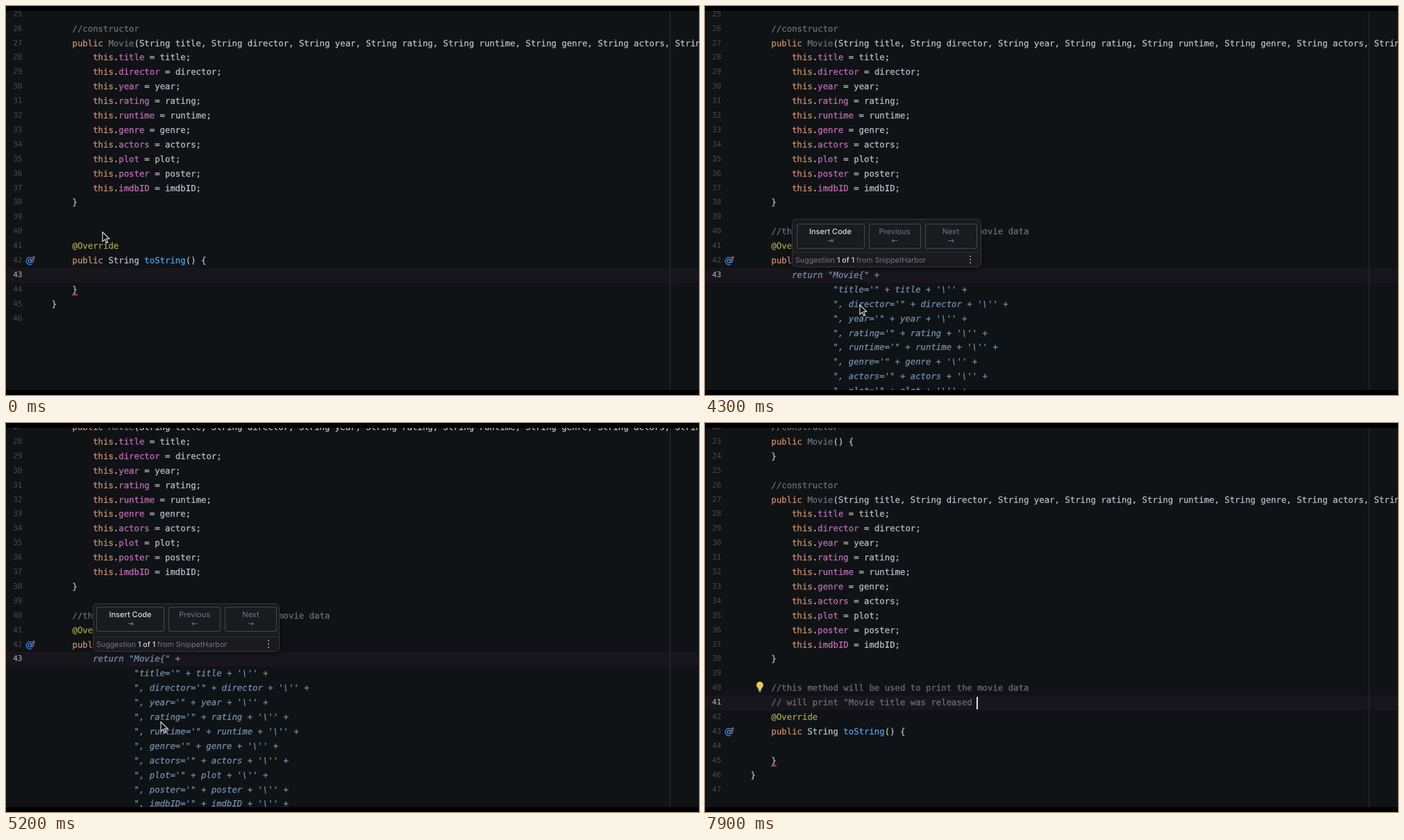
These frames come from a looping animation (998 by 561 pixels, 8 s). An HTML page:

```html
<!DOCTYPE html>
<html lang="en">
<head>
<meta charset="utf-8">
<title>Code suggestion</title>
<style>
  html, body { margin: 0; width: 100%; height: 100%; overflow: hidden; background: #000; }
  #editor {
    position: absolute; left: 0; top: 7px; width: 998px; height: 547px;
    overflow: hidden; background: #0f1315; text-rendering: geometricPrecision;
  }
  #editor div, #editor svg { position: absolute; }
  .row { left: 0; width: 998px; height: 20.9px; line-height: 20.9px; white-space: pre; }
  .num {
    left: 0; width: 23.5px; text-align: right; color: #484b50;
    font: 11px/20.9px "DejaVu Sans Mono", monospace;
  }
  .row.cur { background: #18161c; }
  .cur .num { color: #b4b6bb; }
  .code {
    left: 65.8px; color: #bcbec4; font: 12.32px/20.9px "DejaVu Sans Mono", monospace;
    letter-spacing: calc(7.418px - 1ch); -webkit-text-stroke: .25px;
  }
  .key { color: #cf8e6d; }
  .field { color: #c46cbb; }
  .note { color: #a9a34f; }
  .fn { color: #4f9fee; }
  .dim { color: #6c6f74; }
  .ghost { color: #7590b3; font-style: italic; }
  #margin { left: 955.5px; top: 0; width: 1px; height: 547px; background: #2c2f31; }
  #caret { width: 2px; height: 18px; background: #dfe1e5; }
  #popup {
    --pad: 4px; left: 125px; width: 267px; height: 68px;
    border: 1px solid #36383d; border-radius: 6px; background: #191b1f;
    box-shadow: 0 2px 6px #0008; color: #74777d; font: 11px/14px Inter, sans-serif;
  }
  #popup.wide { --pad: 5.5px; width: 271px; }
  .btn {
    top: var(--pad); height: 36px; border: 1px solid #45474c; border-radius: 2px;
    text-align: center; box-sizing: border-box;
  }
  .btn b { display: block; font-weight: 400; margin-top: 3px; }
  .btn span { display: block; font: 11px/13px "DejaVu Sans", sans-serif; }
  .btn.on b { color: #d8dade; font-weight: 500; }
  #foot {
    left: 0; right: 0; top: 47px; height: 21px; border-top: 1px solid #2b2d31;
    line-height: 21px; padding-left: 4px; font-size: 10.7px; white-space: pre;
  }
  #foot b { color: #d8dade; font-weight: 500; }
  #dots { right: 8px; top: 0; color: #c4c6ca; font: 14px/21px "DejaVu Sans", sans-serif; }
</style>
</head>
<body>
<div id="editor">
  <div id="rows"></div>
  <div id="margin"></div>
  <div id="caret"></div>
  <svg id="bulb" width="14" height="18" style="left:72px">
    <circle cx="7" cy="6" r="4.9" fill="#f2c55c"/>
    <path d="M4.6 9h4.8v3H4.6z" fill="#f2c55c"/>
    <path d="M4.8 13h4.4M5.6 15h2.8" stroke="#c9ccd1" stroke-width="1.3"/>
  </svg>
  <div id="popup">
    <div class="btn on" style="left:var(--pad);width:98px"><b>Insert Code</b><span>⇥</span></div>
    <div class="btn" style="left:calc(var(--pad) + 104px);width:75px"><b>Previous</b><span>←</span></div>
    <div class="btn" style="left:calc(var(--pad) + 185px);width:75px"><b>Next</b><span>→</span></div>
    <div id="foot">Suggestion <b>1 of 1</b> from SnippetHarbor<div id="dots">⋮</div></div>
  </div>
  <svg id="mouse" width="14" height="20">
    <path d="M1 1v13.6l3.2-3 2.4 5.2 2.1-.9-2.3-5.1h4.4z" fill="#0a0a0a" stroke="#e8e8e8" stroke-width="1.1"/>
  </svg>
</div>
<script>
const LOOP = 8000, STEP = 100, TOP = 7;
const ROW = 20.9, CHAR = 7.418, LEFT = 65.8;
const FIRST = 22, FIRST_Y = -50.5;   // number and centre of the first row, unscrolled
const POPUP_ROOM = 36;               // the popup flips below the code when its top would be higher
const $ = id => document.getElementById(id);

const fields = 'title director year rating runtime genre actors plot poster imdbID'.split(' ');
const extra = 'imdbRating imdbVotes type response error'.split(' ');
const pad = ' '.repeat(4);
const comment = '//this method will be used to print the movie data';
const comment2 = '// will print "Movie title was released ';

const params = fields.map(f => 'String ' + f).join(', ');
const head = [
  '//constructor', 'public Movie() {', '}', '',
  '//constructor', `public Movie(${params}) {`,
  ...fields.map(f => `${pad}this.${f} = ${f};`), '}', ''
].map(s => pad + s);

const ghost = [
  pad + pad + 'return "Movie{" +',
  ...[...fields, ...extra].map((f, i) => `${pad.repeat(4)}"${i ? ', ' : ''}${f}='" + ${f} + '\\'' +`),
  pad.repeat(4) + "'}';"
];

const icon = `<svg width="18" height="16" style="left:28px;top:2px" fill="none">
  <circle cx="6.3" cy="8.8" r="2.3" stroke="#4a86e0" stroke-width="1.3"/>
  <path d="M9 13.2A5.2 5.2 0 1 1 11.5 8.8Q11.3 11.4 9 10.6V6.4" stroke="#4a86e0" stroke-width="1.2"/>
  <path d="M12 8V2.4M10 4.2l2-2 2 2" stroke="#d0574f" stroke-width="1.1"/></svg>`;
const squiggle = `<svg width="9" height="5" style="left:95px;top:15px" fill="none">
  <path d="M.5 3.5l2-2 2 2 2-2 1.5 1.5" stroke="#e0504c" stroke-width="1.2"/></svg>`;

const kinds = ['key', 'field', 'note', 'fn', 'dim'];
const token = /(public|this)|(?<=this\.)(\w+)|(@Override)|(toString)|(Movie)/g;
const span = (kind, s) => `<span class="${kind}">${s}</span>`;
const paint = s => s.trim().startsWith('//')
  ? span('dim', s)
  : s.replace(token, (m, ...g) => span(kinds[g.slice(0, 5).findIndex(Boolean)], m));

// Piecewise linear value at time t through [time, value] points
function along(t, pts) {
  if (t <= pts[0][0]) return pts[0][1];
  for (let i = 1; i < pts.length; i++) {
    const [a, u] = pts[i - 1], [b, v] = pts[i];
    if (t <= b) return u + (v - u) * (t - a) / (b - a);
  }
  return pts[pts.length - 1][1];
}
const within = (t, spans) => spans.some(([a, b]) => t >= a && t < b);
const show = (el, on) => { el.style.display = on ? 'block' : 'none'; };

function place(el, x, y) {
  el.style.left = x + 'px';
  el.style.top = y - TOP + 'px';
}

const lineAt = t => t < 200 ? 43 : t < 2200 ? 40 : t < 2300 ? 42 : t < 6100 ? 43 : t < 6300 ? 40 : 41;

function draw(t) {
  const scroll = along(t, [[4300, 0], [4600, -284], [4900, -284], [5100, -130], [5300, 35], [5400, 54], [5500, 57]]);
  const typed = Math.round(along(t, [[500, 0], [900, 12], [1800, 38], [2100, 50]]));
  const typed2 = Math.round(along(t, [[6400, 0], [6800, 14], [7000, 14], [7800, 40]]));
  const suggesting = within(t, [[4000, 5700]]);
  const split = t >= 6300;
  const cur = lineAt(t);
  const centre = n => FIRST_Y + (n - FIRST) * ROW + scroll;

  const code = [...head, pad + comment.slice(0, typed)];
  if (split) code.push(pad + comment2.slice(0, typed2));
  code.push(pad + '@Override', pad + 'public String toString() {', '', pad + '}', '}', '');

  let y = centre(FIRST) - ROW / 2 - TOP, html = '';
  const add = (n, body, mark = '') => {
    html += `<div class="row${n === cur ? ' cur' : ''}" style="top:${y.toFixed(2)}px">`
      + `<div class="num">${n || ''}</div>${mark}<div class="code">${body}</div></div>`;
    y += ROW;
  };
  code.forEach((s, i) => {
    const n = FIRST + i;
    if (suggesting && n === 43) {
      ghost.forEach((g, k) => add(k ? 0 : n, span('ghost', g)));
    } else {
      const mark = s.includes('toString') ? icon : n === (split ? 45 : 44) ? squiggle : '';
      add(n, paint(s), mark);
    }
  });
  $('rows').innerHTML = html;

  const col = cur === 43 ? 8 : cur === 42 ? 30 : 4 + (split ? typed2 : typed);
  place($('caret'), Math.round(LEFT + col * CHAR - 1), Math.round(centre(cur) - 9));
  show($('caret'), !within(t, [[0, 200], [2600, 2800], [3000, 3300], [3500, 3800], [4000, 4800], [5100, 6100]]));

  const line = centre(43), above = line - 81;
  const popupY = above >= POPUP_ROOM ? above : line + ghost.length * ROW - 9;
  $('popup').className = t < 4400 ? 'wide' : '';
  $('popup').style.top = Math.round(popupY) - TOP + 'px';
  show($('popup'), suggesting);

  $('bulb').style.top = centre(40) - 11 - TOP + 'px';
  show($('bulb'), within(t, [[7000, 7100], [7900, LOOP]]));

  const mx = along(t, [[0, 139], [500, 141], [501, 223], [5800, 223], [6200, 493]]);
  const my = along(t, [[100, 326], [500, 293], [501, 431], [5200, 431], [5400, 445], [5800, 445], [6000, 321], [6200, 377]]);
  place($('mouse'), mx - 1, my - 1);
  show($('mouse'), within(t, [[0, 600], [4100, 6300]]));
}

const start = performance.now();
let last = -1;
function tick() {
  const t = Math.floor((performance.now() - start) % LOOP / STEP) * STEP;
  if (t !== last) draw(last = t);
  requestAnimationFrame(tick);
}
tick();
</script>
</body>
</html>
```
